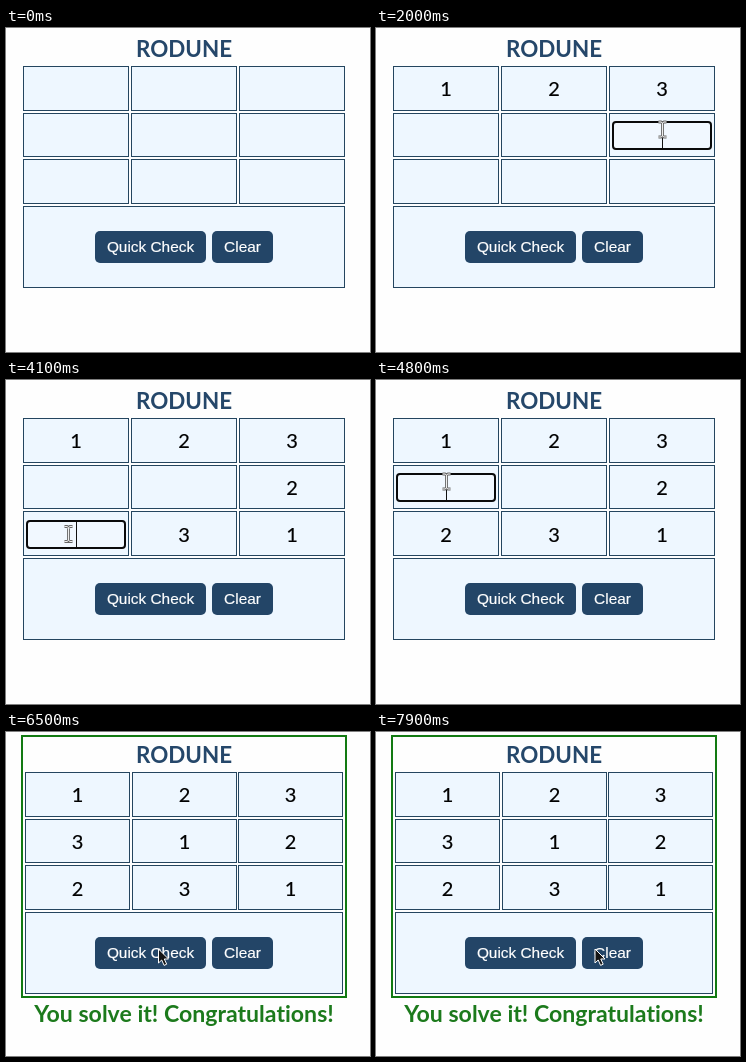
An HTML page that plays this animation: 364 by 324 pixels, repeating every 8000 ms.

```html
<!DOCTYPE html>
<html lang="en">
<head>
<meta charset="utf-8">
<title>Rodune</title>
<style>
  html, body { margin: 0; width: 100%; height: 100%; overflow: hidden; background: #fefefe; }
  svg { display: block; }
  text { text-anchor: middle; font-family: Lato, Carlito, sans-serif; font-variant-ligatures: none; }
  .title { font-size: 22.4px; font-weight: 700; fill: #25476a; }
  .cell { fill: #eef7ff; stroke: #24455f; }
  .digit { font-size: 20px; fill: #000; stroke: #000; stroke-width: .2; }
  .button { fill: #234567; }
  .label { font: 15.4px "Liberation Sans", Arial, sans-serif; fill: #fff; stroke: #fff; stroke-width: .2; }
  .frame { fill: none; stroke: #127a12; stroke-width: 2; }
  .praise { font-size: 23.1px; font-weight: 700; fill: #1c7a1c; }
  .ring { fill: #f1f8ff; stroke: #0a0a0a; stroke-width: 2; }
  .caret { stroke: #111; }
</style>
</head>
<body>
<svg id="stage" width="364" height="324" viewBox="0 0 364 324"></svg>
<script>
const LOOP = 8000, STEP = 100, ENTER = 100, SOLVED = 6500, LEAVE = 7200, REST = 7800;
const CHECK = { x: 152.5, y: 217 }, CLEAR = { x: 219, y: 217 };

// The grid is filled in a spiral, one click per cell.
const order = [0, 1, 2, 5, 8, 7, 6, 3, 4];
const clicks = [300, 900, 1600, 1900, 2500, 3100, 4100, 4600, 5700];

const colOf = cell => cell % 3;
const rowOf = cell => Math.floor(cell / 3);
const answer = cell => (colOf(cell) - rowOf(cell) + 3) % 3 + 1;

// The pointer overshoots sideways and stops a little high when moving vertically.
const turns = order.map((cell, i) => {
  const from = order[Math.max(0, i - 1)];
  const across = colOf(cell) - colOf(from), down = rowOf(cell) - rowOf(from);
  const next = clicks[i + 1] || SOLVED;
  return {
    cell,
    focus: clicks[i],
    typed: clicks[i] + 0.6 * (next - clicks[i]),
    next,
    x: 178.5 + 108 * (colOf(cell) - 1) + 8 * across,
    y: 61 + 46.5 * rowOf(cell) - 6 * Math.abs(down)
  };
});

const stage = document.getElementById("stage");

function set(el, attrs) {
  for (const key in attrs) el.setAttribute(key, attrs[key]);
}

function add(tag, attrs, parent = stage, text = "") {
  const el = document.createElementNS("http://www.w3.org/2000/svg", tag);
  set(el, attrs);
  el.textContent = text;
  return parent.appendChild(el);
}

function show(el, on) {
  el.style.display = on ? "" : "none";
}

const frame = add("rect", { class: "frame", x: 16, y: 4, width: 324, height: 261 });
const board = add("g", {});
add("text", { class: "title", x: 178, y: 29 }, board, "RODUNE");
const cells = Array.from({ length: 9 }, (_, i) => add("rect", {
  class: "cell", y: 38.5 + Math.ceil(46.5 * rowOf(i)), height: 44 - rowOf(i) % 2
}, board));
const footer = add("rect", { class: "cell", x: 17.5, y: 178.5, height: 81 }, board);
const ring = add("rect", { class: "ring", width: 98, height: 27, rx: 3 }, board);
const digits = cells.map((_, i) =>
  add("text", { class: "digit", y: 68 + 47 * rowOf(i) }, board));
const caret = add("line", { class: "caret" }, board);

function button(x, width, label) {
  add("rect", { class: "button", x, y: 203, width, height: 32, rx: 5 }, board);
  add("text", { class: "label", x: x + width / 2, y: 224 }, board, label);
}
button(89, 111, "Quick Check");
button(206, 61, "Clear");

const praise = add("text", { class: "praise", x: 178, y: 290 }, stage,
  "You solve it! Congratulations!");

const beam = add("g", { fill: "none" });
const beamShape = "M-4-7.5H-1.5L0-6.5L1.5-7.5H4M0-6.5V6.5M-4 7.5H-1.5L0 6.5L1.5 7.5H4";
add("path", { d: beamShape, stroke: "#666", "stroke-width": 2.8 }, beam);
add("path", { d: beamShape, stroke: "#eee", "stroke-width": 1 }, beam);
const arrow = add("path", {
  d: "M0 0V14L3.2 11L5.6 16.4L8.2 15.2L5.8 10H10Z",
  fill: "#151515", stroke: "#fff", "stroke-width": 1
});

function glide(a, b, t, t0, t1) {
  const p = Math.min(1, Math.max(0, (t - t0) / (t1 - t0)));
  const e = p * p * (3 - 2 * p);
  return { x: a.x + (b.x - a.x) * e, y: a.y + (b.y - a.y) * e };
}

function pointerAt(t) {
  const i = turns.findIndex(turn => t < turn.next);
  if (i < 0) return glide(CHECK, CLEAR, t, LEAVE, REST);
  const turn = turns[i];
  return glide(turn, turns[i + 1] || CHECK, t, turn.typed, turn.next);
}

function layout(solved) {
  const left = solved ? 19.5 : 17.5;
  const pitch = solved ? 106.5 : 108;
  const width = solved ? 104 : 105;
  set(board, { transform: `translate(0 ${solved ? 2 : 0})` });
  cells.forEach((cell, i) => {
    const x = left + Math.ceil(pitch * colOf(i));
    set(cell, { x, width });
    set(digits[i], { x: x + width / 2 });
  });
  set(footer, { x: left, width: solved ? 317 : 321 });
  show(frame, solved);
  show(praise, solved);
}

function render(time) {
  const t = Math.floor((time % LOOP) / STEP) * STEP;
  const solved = t >= SOLVED;
  layout(solved);

  for (const { cell, typed } of turns) {
    digits[cell].textContent = t >= typed ? answer(cell) : "";
  }

  const active = turns.find(turn => t >= turn.focus && t < turn.next);
  show(ring, active);
  show(caret, active);
  if (active) {
    const left = 21 + 108 * colOf(active.cell), top = 47 + 47 * rowOf(active.cell);
    const x = left + 49.5 + (t >= active.typed ? 6 : 0);
    set(ring, { x: left, y: top });
    set(caret, { x1: x, x2: x, y1: top + 1, y2: top + 26 });
  }

  const { x, y } = pointerAt(t);
  const inGrid = y < 176;
  show(beam, t >= ENTER && inGrid);
  show(arrow, t >= ENTER && !inGrid);
  set(inGrid ? beam : arrow, { transform: `translate(${x} ${y})` });
}

let start = null;
function tick(now) {
  if (start === null) start = now;
  render(now - start);
  requestAnimationFrame(tick);
}
render(0);
requestAnimationFrame(tick);
</script>
</body>
</html>
```
